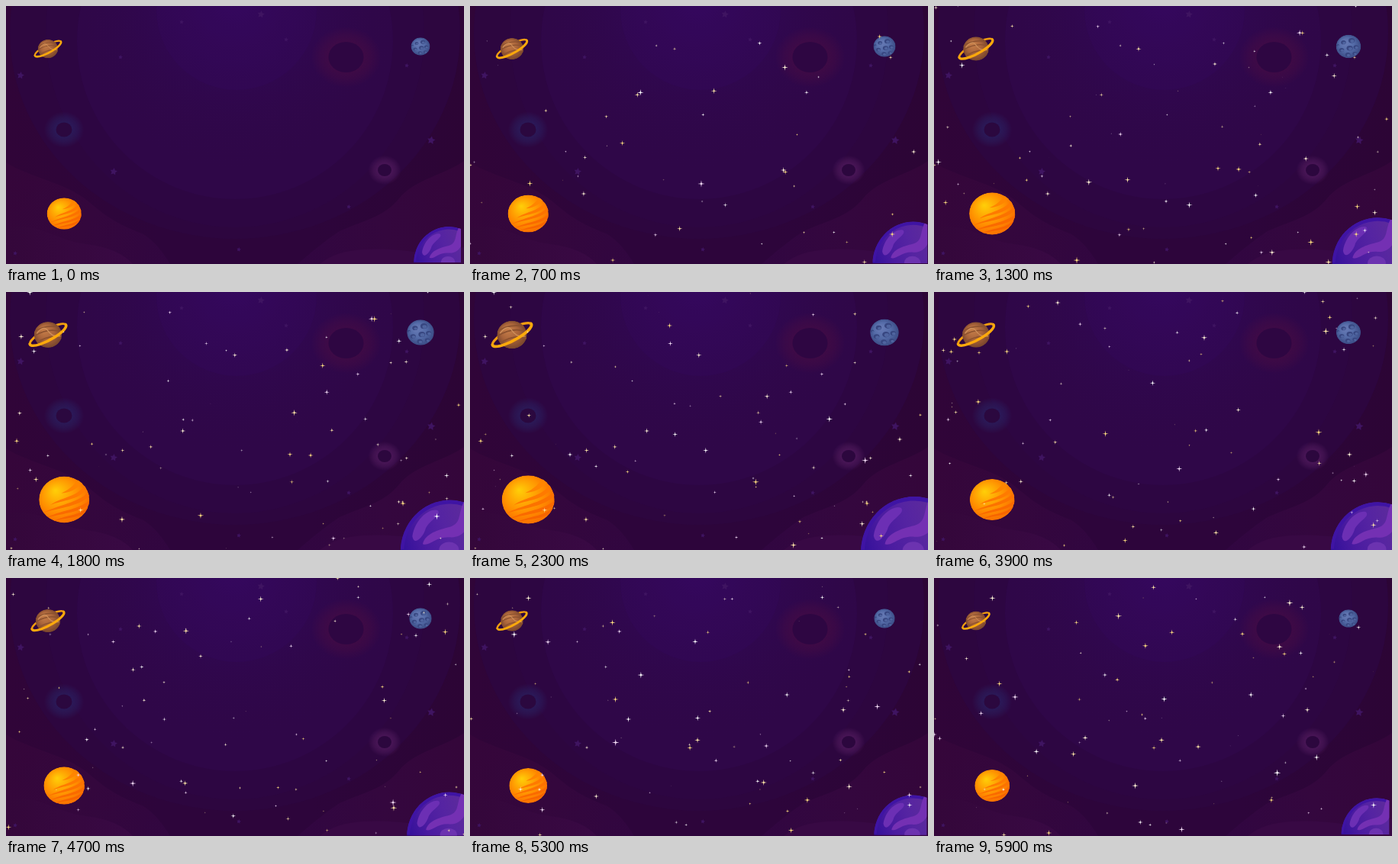
Recreate the animation shown at these times as an HTML page with a canvas. Size 600x338 px, loop 6 s.

```html
<!DOCTYPE html>
<html lang="en">
<head>
<meta charset="utf-8">
<title>Space</title>
<style>
html, body { margin: 0; width: 100%; height: 100%; overflow: hidden; background: #2d053a; }
canvas { display: block; width: 600px; height: 338px; }
</style>
</head>
<body>
<canvas id="stage" width="600" height="338"></canvas>
<script>
const W = 600, H = 338, LOOP = 6, STEP = 0.1, TAU = Math.PI * 2;
const canvas = document.getElementById('stage');
const c = canvas.getContext('2d');

let seed = 7;
const rnd = () => (seed = (seed * 16807) % 2147483647) / 2147483647;

function oval(x, y, rx, ry, fill) {
  c.beginPath();
  c.ellipse(x, y, rx, ry, 0, 0, TAU);
  c.fillStyle = fill;
  c.fill();
}

function shape(d, fill) {
  c.fillStyle = fill;
  c.fill(new Path2D(d));
}

function line(d, color, width) {
  c.strokeStyle = color;
  c.lineWidth = width;
  c.stroke(new Path2D(d));
}

function fade(gradient, ...stops) {
  stops.forEach((s, i) => gradient.addColorStop(i / (stops.length - 1), s));
  return gradient;
}

// Run draw in a local space centred on x, y.
function at(x, y, sx, sy, draw) {
  c.save();
  c.translate(x, y);
  c.scale(sx, sy);
  draw();
  c.restore();
}

function clipDisc() {
  c.beginPath();
  c.arc(0, 0, 1, 0, TAU);
  c.clip();
}

// Linear growth to the peak time, then linear return by the end of the loop.
const swell = (t, peak, gain) =>
  1 + gain * (t < peak ? t / peak : (LOOP - t) / (LOOP - peak));

function faintStar(x, y, r) {
  c.beginPath();
  for (let i = 0; i < 10; i++) {
    const a = i * TAU / 10 - 1.4, q = i % 2 ? r * 0.5 : r;
    c.lineTo(x + q * Math.cos(a), y + q * Math.sin(a));
  }
  c.fillStyle = '#3f1461';
  c.fill();
}

function hole(x, y, rx, ry, core, glow, spread) {
  at(x, y, rx, ry, () => {
    const g = c.createRadialGradient(0, 0, 0.9, 0, 0, spread);
    oval(0, 0, spread, spread, fade(g, `rgba(${glow},.45)`, `rgba(${glow},.27)`, `rgba(${glow},0)`));
    oval(0, 0, 1, 1, core);
  });
}

function backdrop() {
  c.fillStyle = fade(c.createLinearGradient(0, 0, W, 0), '#300538', '#2d053b', '#2d053b', '#2c0535');
  c.fillRect(0, 0, W, H);
  oval(300, 35, 295, 270, '#2d063f');
  oval(300, 35, 248, 255, '#2d0642');
  oval(300, 46, 207, 207, '#2f0748');
  const core = c.createRadialGradient(300, -10, 0, 300, -10, 230);
  oval(300, 46, 207, 207, fade(core, 'rgba(56,8,102,.7)', 'rgba(50,8,90,.35)', 'rgba(47,7,72,0)'));
  oval(302, 5, 105, 105, 'rgba(54,10,98,.25)');

  const left = fade(c.createLinearGradient(0, 230, 215, H), '#35063a', '#34073d', '#310640');
  const front = fade(c.createLinearGradient(0, 0, 166, 0), '#34073a', '#390944');
  const right = fade(c.createLinearGradient(W, 230, 385, H), '#34063a', '#34073e', '#310641');
  shape('M0 205C30 224 80 232 108 256S150 287 178 298Q197 308 215 338H0Z', left);
  shape('M600 203C575 221 535 227 515 252S465 282 437 295Q419 306 382 338H600Z', right);
  shape('M0 289C45 284 62 306 105 312Q147 317 166 338H0Z', front);
  shape('M411 338Q431 321 468 319T540 323L600 316V338Z', '#380944');

  [[334, 11, 5], [230, 21, 3], [367, 44, 3], [150, 67, 3], [19, 91, 5], [525, 78, 3],
   [557, 176, 5.5], [141, 217, 5], [449, 263, 3], [305, 319, 3], [12, 324, 3]]
    .forEach(s => faintStar(...s));

  hole(445.5, 67, 23, 20, '#2e0642', '82,14,64', 2);
  hole(76, 162, 10.5, 9.5, '#2b083f', '40,50,118', 2.5);
  hole(496, 215, 9, 8, '#2c073e', '108,42,116', 2.4);
}

function ringedPlanet(t) {
  const s = swell(t, 2.7, 0.57);
  at(55, 56, s, s, () => {
    const ring = (from, to, color, width) => {
      c.beginPath();
      c.ellipse(0, 0, 19.4, 5.2, -0.5, from, to);
      c.strokeStyle = color;
      c.lineWidth = width;
      c.stroke();
    };
    ring(Math.PI, TAU, '#f09c10', 2.2);
    at(0, 0, 13.2, 12.3, () => {
      clipDisc();
      const g = c.createRadialGradient(-0.3, -0.4, 0.1, 0, 0, 1.1);
      oval(0, 0, 1, 1, fade(g, '#c47c48', '#a8633a', '#70402a'));
      line('M-1 -.2Q-.3 -.8 .8 -.6M-1 .1Q.1 -.6 1 -.2M-.8 .6Q.2 -.1 1 .3', '#8b512f', 0.09);
      line('M-.8 -.1Q-.3 -.8 0 -.3T.9 .1', '#d0925c', 0.07);
    });
    ring(-0.2, Math.PI + 0.2, '#fba90c', 2.6);
  });
}

function sun(t) {
  const s = swell(t, 2.15, 0.55);
  at(76.2, 272, 22.6 * s, 20.8 * s, () => {
    clipDisc();
    const g = c.createRadialGradient(-0.35, -0.4, 0, -0.1, -0.1, 1.2);
    oval(0, 0, 1, 1, fade(g, '#ffcf08', '#ffac04', '#ff8b00', '#f86b00'));
    // Slanted bands fanning out to the upper right.
    c.rotate(-0.4);
    shape('M0 -.3C.4 -.3 .7 -.5 .9 -.6L1 -.4C.6 -.2 .3 -.2 0 -.3Z', '#ff8500');
    shape('M-.6 0C-.1 -.15 .5 .1 1 -.25V-.08C.5 .25 0 0 -.6 0Z', '#ff7a00');
    shape('M-1 .2C-.3 .1 .4 .35 1 .08V.24C.4 .5 -.2 .25 -1 .2Z', '#fc7200');
    shape('M-1 .45C-.3 .35 .3 .65 1 .4V.52C.4 .8 -.3 .5 -1 .45Z', '#fa6a00');
    shape('M-.8 .7C-.2 .6 .2 .9 .8 .65L.6 .8C.2 1 -.3 .7 -.8 .7Z', '#f76400');
  });
}

function moon(t) {
  const s = swell(t, 2.2, 0.52);
  at(543, 53, 12.5 * s, 11.7 * s, () => {
    clipDisc();
    const g = c.createRadialGradient(-0.3, -0.35, 0.1, 0, 0, 1.1);
    oval(0, 0, 1, 1, fade(g, '#6679b4', '#536aa6', '#374780'));
    [[-0.4, -0.35, 0.2], [0.25, -0.5, 0.25], [0.6, 0.05, 0.2], [0.1, 0.15, 0.25],
     [-0.55, 0.3, 0.2], [-0.05, 0.7, 0.2], [0.5, 0.6, 0.17], [-0.85, -0.1, 0.12]]
      .forEach(([x, y, r]) => {
        oval(x, y, r, r * 0.85, '#374680');
        oval(x + 0.05, y + 0.05, r * 0.65, r * 0.55, '#4f649f');
      });
  });
}

function violetPlanet(t) {
  const s = swell(t, 2.5, 0.57);
  at(576, 329, s, s, () => {
    c.beginPath();
    c.rect(-60, -60, 80, 67);
    c.clip();
    at(4, 8, 46, 48, () => {
      clipDisc();
      const g = c.createLinearGradient(-0.95, 0, 0.4, -0.5);
      oval(0, 0, 1, 1, fade(g, '#33109a', '#4a1ba0', '#5524a2', '#5c2a9c'));
      line('M-.97 -.05A.97 .97 0 0 1 .35 -.9', '#3f14a4', 0.08);
      // Pale patch along the rim and a winding band to its right.
      shape('M-.76 -.3C-.7 -.65 -.4 -.85 -.25 -.8C-.15 -.7 -.45 -.6 -.5 -.42C-.55 -.28 -.72 -.1 -.76 -.3Z', '#6c2fb4');
      shape('M.3 -1C.15 -.75 .25 -.55 0 -.48C-.25 -.42 -.5 -.35 -.55 -.15' +
            'C-.4 -.1 -.3 -.3 0 -.28C.35 -.26 .4 -.6 .55 -.85Z', '#7430b3');
      oval(-0.02, -0.04, 0.2, 0.15, '#6c33b0');
    });
  });
}

const tints = ['#ffffff', '#fff3d6', '#ffe9a8', '#f3dcf5', '#ffdf80'];
const sparks = Array.from({ length: 400 }, (_, i) => ({
  x: rnd() * W,
  y: rnd() * H,
  r: 1.8 + rnd() * 3,
  born: i / 400 * LOOP - 0.02,
  life: 0.9 + rnd() * 0.6,
  tint: tints[Math.floor(rnd() * tints.length)]
}));

function sparkle({ x, y, r, born, life, tint }, t) {
  const age = (t - born) / life;
  if (age <= 0 || age >= 1) return;
  const glow = Math.sin(Math.PI * age), q = r * Math.sqrt(glow), k = q * 0.14;
  c.globalAlpha = Math.min(1, 0.25 + glow);
  at(x, y, 1, 1, () => {
    shape(`M0 ${-q}L${k} ${-k}L${q} 0L${k} ${k}L0 ${q}L${-k} ${k}L${-q} 0L${-k} ${-k}Z`, tint);
    oval(0, 0, q * 0.22, q * 0.22, tint);
  });
  c.globalAlpha = 1;
}

function render(t) {
  backdrop();
  [ringedPlanet, sun, moon, violetPlanet].forEach(draw => draw(t));
  sparks.forEach(s => sparkle(s, t));
}

let shown = -1;
function tick() {
  const step = Math.floor(performance.now() / 1000 / STEP) % Math.round(LOOP / STEP);
  if (step !== shown) render((shown = step) * STEP);
  requestAnimationFrame(tick);
}
tick();
</script>
</body>
</html>
```
